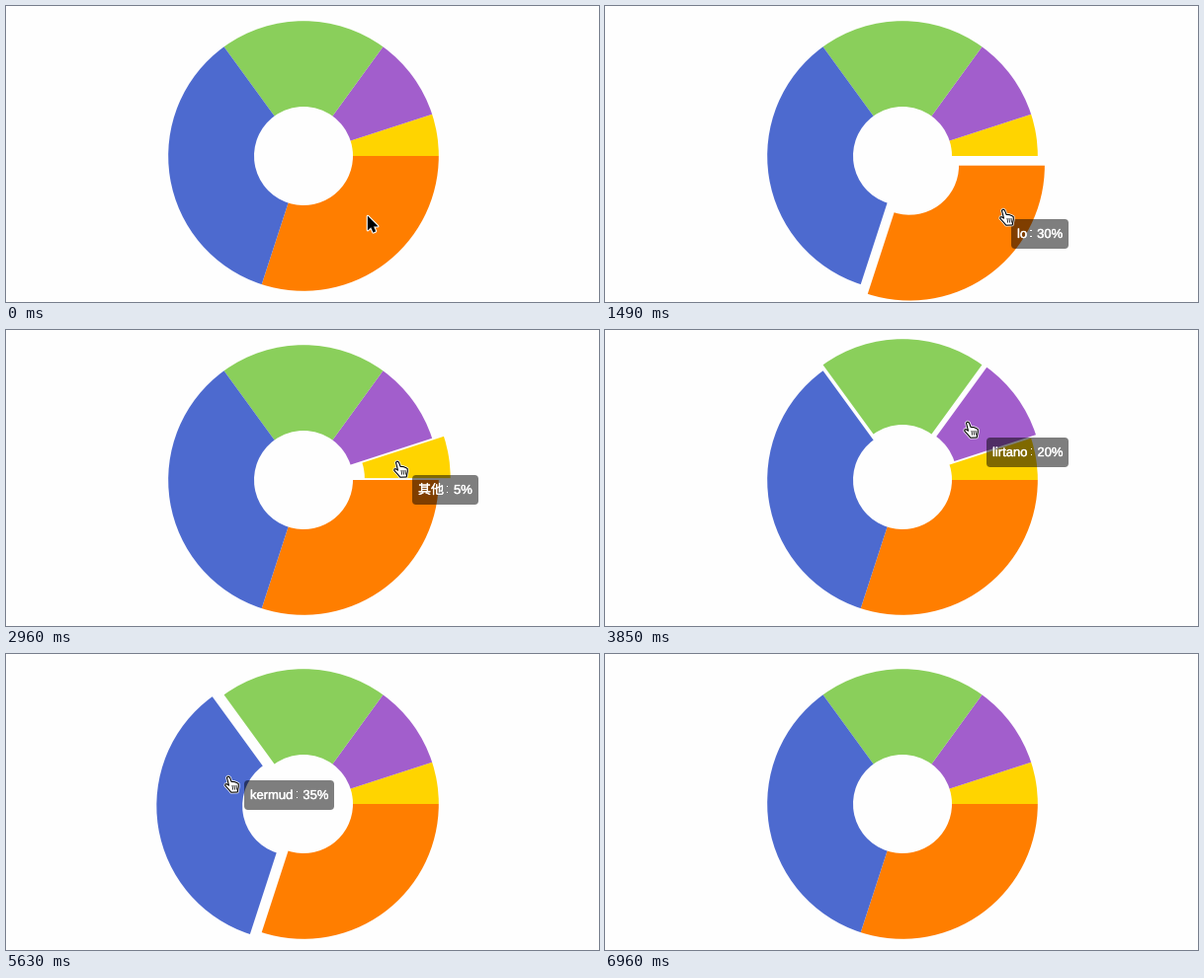
These frames come from a looping animation (600 by 300 pixels, 8440 ms). A matplotlib script:

```python
import numpy as np
import matplotlib.pyplot as plt
from matplotlib import patheffects as pe
from matplotlib.animation import FuncAnimation
from matplotlib.patches import FancyBboxPatch, Polygon, Wedge

W, H, DPI = 600, 300, 100
LOOP, INTERVAL, STEPS = 8440, 40, 57
FRAMES = LOOP // INTERVAL
PX = 72 / DPI  # points per pixel

CENTER = np.array([301, 152])
OUTER, INNER, PULL = 136.8, 50, 12
FIRST_ANGLE = -108
LEAVE = 45  # step at which the pointer leaves the chart
TIP_LAG, TIP_OFFSET = 0.5, 11
PAD, COLON_GAP, TIP_HEIGHT = 6, 10, 30

plt.rcParams["font.family"] = ["Liberation Sans", "Noto Sans CJK JP"]
plt.rcParams["text.hinting"] = "none"

# name, percent, colour, step at which the pointer enters
SLICES = [
    ("lo", 30, "#ff7e00", 1),
    ("其他", 5, "#ffd400", 15),
    ("nelvir", 10, "#a25ecc", 20),
    ("lirtano", 20, "#8acf5b", 25),
    ("kermud", 35, "#4d6acf", 31),
]

# pointer stops: step, x, y
STOPS = np.array([
    (7, 366, 213), (8, 350, 201), (9, 396, 204), (12, 421, 212),
    (15, 406, 165), (18, 403, 139), (19, 403, 139), (20, 397, 134),
    (23, 383, 102), (25, 383, 102), (29, 321, 70), (30, 321, 70),
    (31, 294, 83), (35, 233, 109), (37, 233, 109), (38, 226, 125),
    (41, 225, 202), (45, 233, 264), (46, 250, 283),
])

ARROW = np.array([(0, 0), (0, 14.2), (3.3, 11.2), (5.6, 16.4), (8, 15.3),
                  (5.8, 10.4), (10.2, 10.2)])
HAND = np.array([(-2.5, 0.2), (-1.1, -1), (0.4, 0), (2.1, 4.4), (5.1, 4.6),
                 (7.6, 5.6), (9.2, 6.6), (9.3, 9.4), (8.2, 15), (1.8, 15.2),
                 (-0.5, 12.4), (-4.2, 8.4), (-4, 6.8), (-2.5, 6.8),
                 (-0.5, 8.2)])
CREASES = np.array([point for i in range(3) for point in
                    ((3 + 2 * i, 8.4), (3.5 + 2 * i, 12.2),
                     (np.nan, np.nan))])

fig = plt.figure(figsize=(W / DPI, H / DPI), dpi=DPI, facecolor="#fefefe")
ax = fig.add_axes([0, 0, 1, 1])
ax.set_xlim(0, W)
ax.set_ylim(H, 0)
ax.axis("off")


def make_wedges():
    wedges, angle = [], FIRST_ANGLE
    leaves = [s[3] for s in SLICES[1:]] + [LEAVE]
    for (_, percent, color, enter), leave in zip(SLICES, leaves):
        end = angle + percent * 3.6
        wedge = Wedge(CENTER, OUTER, -end, -angle, width=OUTER - INNER,
                      fc=color, lw=0)
        mid = np.radians((angle + end) / 2)
        pull = PULL * np.array([np.cos(mid), -np.sin(mid)])
        ax.add_patch(wedge)
        wedges.append((wedge, pull, enter, leave))
        angle = end
    return wedges


def make_label(stroke):
    return ax.text(0, 0, "", color="white", size=13 * PX, va="baseline",
                   zorder=4, path_effects=[pe.withStroke(
                       linewidth=stroke * PX, foreground="white")])


def make_cursor(shape, fill, width):
    halo = [pe.withStroke(linewidth=2.6 * PX, foreground="white")]
    return ax.add_patch(Polygon(shape, fc=fill, ec="black", lw=width * PX,
                                joinstyle="round", zorder=5,
                                path_effects=halo))


wedges = make_wedges()
tip_box = ax.add_patch(FancyBboxPatch(
    (0, 0), 1, TIP_HEIGHT, boxstyle="round,pad=0,rounding_size=4",
    fc=(0, 0, 0, 0.5), lw=0, zorder=3))
name_label, value_label = make_label(0.35), make_label(0.35)
colon_label = make_label(0)
tip_parts = (tip_box, name_label, colon_label, value_label)
arrow = make_cursor(ARROW, "black", 0.3)
hand = make_cursor(HAND, "white", 1.1)
creases, = ax.plot([], [], color="black", lw=0.8 * PX, zorder=6)


def pointer(step):
    return np.array([np.interp(step, STOPS[:, 0], STOPS[:, i])
                     for i in (1, 2)]).round()


def ramp(steps):
    return np.clip(steps / 2, 0, 1)


def put(label, text, x, y):
    """Place a label and return the x where it ends."""
    label.set_text(text)
    label.set_position((x, y))
    return x + label.get_window_extent().width


def place_tip(step):
    name, percent, *_ = [s for s in SLICES if s[3] < step][-1]
    x, y = pointer(step - TIP_LAG) + TIP_OFFSET
    base = y + 19
    end = put(name_label, name, x + PAD, base)
    put(colon_label, ":", end + 2, base - 1)
    end = put(value_label, f"{percent}%", end + COLON_GAP, base)
    tip_box.set_bounds(x, y, round(end + PAD - x), TIP_HEIGHT)


def update(frame):
    # the picture holds still within each step
    step = int(((frame + 1) * INTERVAL - 1) * STEPS / LOOP)

    for wedge, pull, enter, leave in wedges:
        amount = ramp(step - enter) - ramp(step - leave)
        wedge.set_center(CENTER + pull * amount)

    show_tip = 2 <= step <= LEAVE + 1
    show_hand = 2 <= step <= LEAVE
    for part in tip_parts:
        part.set_visible(show_tip)
    hand.set_visible(show_hand)
    creases.set_visible(show_hand)
    arrow.set_visible(step < 2 or step == LEAVE + 1)

    spot = pointer(step)
    hand.set_xy(HAND + spot)
    arrow.set_xy(ARROW + spot)
    creases.set_data(*(CREASES + spot).T)
    if show_tip:
        place_tip(step)
    return ()


anim = FuncAnimation(fig, update, frames=FRAMES, interval=INTERVAL,
                     repeat=True, repeat_delay=0)
plt.show()
```
